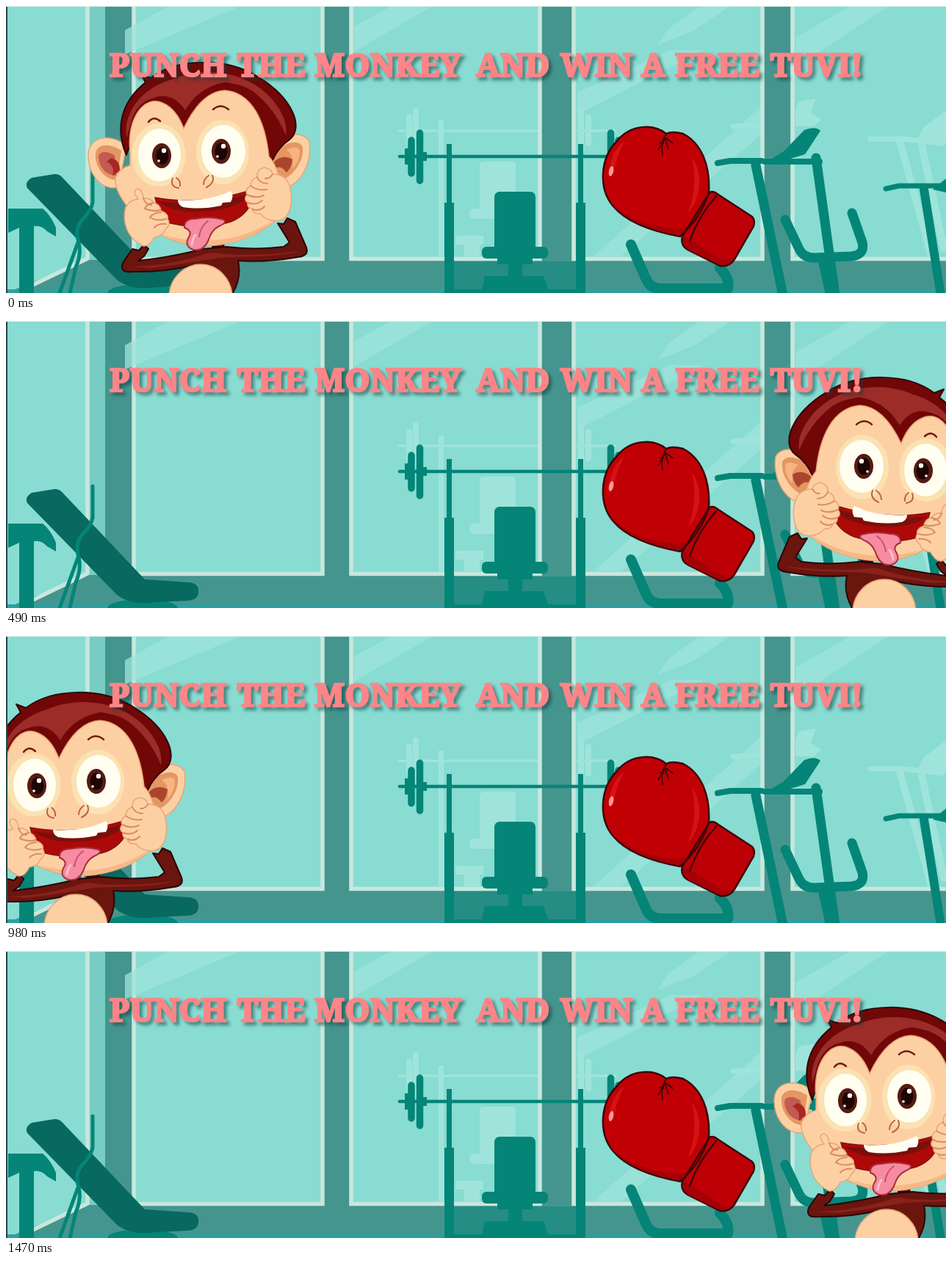
An HTML page that plays this animation: 1280x391 px, repeating every 1.54 s.

```html
<!DOCTYPE html>
<html lang="en">
<head>
<meta charset="utf-8">
<title>Punch the monkey</title>
<style>
html, body { margin: 0; width: 100%; height: 100%; overflow: hidden; background: #45958f; }
svg { display: block; width: 100vw; height: 100vh; }
.line { fill: none; stroke-linecap: round; stroke-linejoin: round; }
.pane { fill: #88dcd2; stroke: #c8e7dd; stroke-width: 5.5; }
.far { fill: #9fe4db; }
.far .line { stroke: #9fe4db; }
.gear { fill: #048577; }
.gear .line { stroke: #048577; }
.skin { fill: #fdd0a3; stroke: #e9a678; stroke-width: 1.5; }
.fur { fill: #6b150f; stroke: #2c0505; stroke-width: 2; stroke-linejoin: round; }
.head { font: 900 43px "Noto Serif", "Liberation Serif", serif; letter-spacing: .5px; fill: #fd8587; stroke: #fd8587; stroke-width: 2.6; filter: drop-shadow(4px 4px 2px rgba(15, 60, 60, .55)); }
</style>
</head>
<body>
<svg viewBox="0 0 1280 391" preserveAspectRatio="none">
  <clipPath id="glass"><path d="M474 0H724V341H474ZM777 0H1027V341H777ZM1075 0H1280V341H1075Z"/></clipPath>

  <g id="room">
    <path fill="#45958f" d="M0 0H1280V391H0Z"/>
    <path fill="#88dcd2" d="M0 0H111V346L0 391Z"/>
    <path fill="#77cdc3" d="M113 0H135V346H113Z"/>
    <path class="line" stroke="#c8e7dd" stroke-width="5.5" d="M111 -5V344L22 387"/>
    <path fill="#45958f" d="M116 347H140V391H28Z"/>
    <g id="panes"></g>
    <path class="far" d="M162 33L222 0H320L162 66ZM474 28L525 0H581L474 62ZM887 53L903 30L945 0H987L936 34ZM778 118L905 60L950 60L778 148ZM800 341L1027 138V176L838 341ZM1075 43L1150 0H1202L1075 84Z" opacity=".75"/>

    <g class="far" clip-path="url(#glass)">
      <path class="line" stroke-width="3.5" d="M535 170H830"/>
      <path class="line" stroke-width="8" d="M549 151V187M558 142V197M783 142V197M793 151V187"/>
      <path d="M589 156H596V341H589Z"/>
      <rect x="645" y="212" width="49" height="72" rx="5"/>
      <rect x="631" y="276" width="70" height="14" rx="6"/>
      <path d="M612 313H650V325H612ZM624 322H645V348H624Z"/>
      <path class="line" stroke-width="7" d="M990 164L1050 161M1177 181L1222 181L1275 187"/>
      <path class="line" stroke-width="10" d="M1217 184L1260 340M1247 190L1277 330"/>
      <path d="M1046 163L1070 151L1080 130L1103 126L1096 145L1110 155L1100 164ZM1240 184L1250 165L1280 142V187Z"/>
    </g>

    <g class="gear">
      <path fill="#258d83" d="M608 348H778V391H608Z"/>
      <path fill="#2e9fa0" d="M0 386H1280V391H0Z"/>
      <path d="M3 276H50Q61 285 68 302V314L56 307Q48 298 38 300V391H18V302L3 309Z"/>
      <ellipse cx="186" cy="391" rx="48" ry="12"/>
      <path fill="#07695f" d="M29 248Q25 240 35 234L66 229Q73 228 79 236L189 352L248 356Q263 357 262 369Q262 380 248 381L205 383Q172 388 152 374Z"/>
      <path class="line" stroke-width="5" d="M118 225V268Q116 279 104 291Q93 303 99 322Q103 338 95 356L87 391M98 322L73 391"/>

      <path class="line" stroke-width="4.5" d="M536 205H834"/>
      <path class="line" stroke-width="9.5" d="M552 183V228M563.5 173V238M823.5 173V238M834 183V228"/>
      <path d="M543 194H548V216H543ZM567 199H573V211H567Z"/>
      <path d="M600 188H607V268H610V391H597V268H600ZM779 188H786V268H789V391H776V268H779Z"/>
      <rect x="665" y="253" width="56" height="82" rx="7"/>
      <rect x="648" y="328" width="90" height="16" rx="6"/>
      <path d="M669 342H717V352H703V368H732L740 391H647L652 368H684V352H669ZM608 386H778V391H608Z"/>

      <path class="line" stroke-width="8" d="M969 214L986 211H1029M1034 212H1108"/>
      <path class="line" stroke-width="13" d="M1021 217L1058 394M1103 207L1129 394"/>
      <path d="M1030 216L1059 198L1087 169Q1102 163 1109 170L1088 202L1062 210Z"/>
      <path class="line" stroke-width="13" d="M1061 291L1080 331Q1086 343 1100 343L1151 341Q1170 339 1166 322L1152 282M1112 345L1122 391"/>
      <path class="line" stroke-width="14" d="M851 325L872 373Q878 385 891 385H983Q986 371 972 357"/>
      <path class="line" stroke-width="7" d="M1198 249L1216 245H1280"/>
      <path class="line" stroke-width="12" d="M1250 250L1273 394"/>
      <path d="M1262 250L1280 235V254Z"/>
    </g>
  </g>

  <g id="monkey">
    <path class="fur" d="M172 331L181 333L188 325L194 331L188 341L180 347Q225 342 268 331L300 328Q340 333 378 328L386 322L370 296L378 297L383 289L394 294L409 329Q413 340 398 342Q352 350 316 347Q321 369 309 391H229Q239 366 256 353Q216 363 172 362Q154 364 159 350Z"/>
    <path fill="#8a211b" d="M169 355Q225 354 274 337Q282 335 296 338Q350 341 399 334Q385 339 349 341Q310 342 291 343Q245 351 199 357Z"/>
    <ellipse class="skin" cx="265" cy="397" rx="43" ry="45"/>
    <path class="fur" d="M282 317H298L296 328H281Z"/>

    <g id="ears">
      <path class="skin" d="M164 190C143 174 119 177 113 196C108 222 126 252 153 247Z"/>
      <path fill="#e59662" d="M157 197C142 187 125 187 122 200C120 220 136 238 151 237Z"/>
      <path fill="#c25b55" d="M148 204C139 197 126 197 126 206C127 221 138 231 150 231Z"/>
      <path fill="#a92724" d="M143 207Q156 210 155 225L145 231Q149 218 137 212Z"/>
      <path class="skin" d="M361 195C373 174 405 168 413 185C418 216 397 252 370 248Z"/>
      <path fill="#e59662" d="M363 204C374 186 399 180 404 192C407 212 387 237 372 237Z"/>
      <path fill="#f5b582" d="M382 196Q400 188 400 199Q399 213 390 222Q393 203 382 196Z"/>
      <path fill="#ab442d" d="M365 212Q377 201 390 209Q389 220 382 227Q374 215 365 222Z"/>
    </g>

    <path class="fur" style="fill:#710707" d="M164 203C149 169 155 132 190 104L184 93L197 98C234 70 301 70 344 97C391 126 406 166 386 182Q370 193 362 212L352 185L168 191Z"/>
    <path fill="#9b2c28" d="M164 180C159 143 187 111 226 100C275 79 337 92 367 133Q384 155 381 176Q366 139 336 116C306 96 266 104 244 142C222 108 181 118 164 180Z"/>
    <path fill="#710707" d="M167 192C164 143 190 119 216 126Q234 134 242 152Q260 110 298 104C339 106 362 160 362 212L349 204Z"/>
    <path class="skin" d="M169 201C164 151 189 121 213 132Q232 140 242 167C259 131 278 116 298 115C335 118 353 157 358 205C372 220 382 262 372 287C338 322 273 337 228 319C193 309 145 261 149 234Q154 221 169 217Z"/>
    <path fill="#f6b886" d="M214 311C262 328 325 320 364 291C335 324 272 335 229 318Z"/>

    <g fill="#fbe2b2">
      <ellipse cx="208" cy="203" rx="36.5" ry="43"/>
      <ellipse cx="295" cy="199" rx="36" ry="44"/>
    </g>
    <g fill="#fffef0">
      <ellipse cx="209" cy="203" rx="29" ry="36"/>
      <ellipse cx="296" cy="198" rx="30" ry="36"/>
    </g>
    <g fill="#541b12">
      <ellipse cx="212" cy="204" rx="13" ry="17"/>
      <ellipse cx="293" cy="198" rx="13" ry="17"/>
    </g>
    <g fill="#1d0504">
      <ellipse cx="213" cy="204" rx="8.5" ry="11.5"/>
      <ellipse cx="293" cy="198" rx="8.5" ry="11.5"/>
    </g>
    <g fill="#fff">
      <circle cx="215" cy="197" r="3.2"/><circle cx="296" cy="191" r="3.2"/>
      <circle cx="208" cy="211" r="1.8"/><circle cx="288" cy="205" r="1.8"/>
    </g>
    <path class="line" stroke="#701b13" stroke-width="2.5" d="M194 158Q201 149 210 157M282 141Q292 132 303 141"/>
    <path class="line" stroke="#b96442" stroke-width="2" d="M227 235Q223 246 235 248M232 234Q238 238 237 245M281 231Q285 241 273 247M276 231Q269 236 269 243"/>

    <path fill="#ad0909" stroke="#7d160e" stroke-width="1.5" d="M203 261Q269 273 339 249Q335 283 306 294Q267 306 224 296Q209 287 203 261Z"/>
    <path fill="#79100b" d="M207 266Q270 276 334 255Q316 278 269 280Q229 283 207 266Z"/>
    <path fill="#fffef2" d="M234 264Q276 267 306 252Q311 258 306 267L295 268L293 272Q265 278 241 274Q234 271 234 264Z"/>
    <path fill="#f68ba1" stroke="#a72e3b" stroke-width="2" d="M243 302Q242 290 258 290Q278 286 296 291Q302 295 290 300Q280 305 276 318Q269 335 255 332Q241 327 250 313Q253 306 243 302Z"/>
    <path class="line" stroke="#c75068" stroke-width="2" d="M275 293Q265 300 263 314"/>
    <path class="line" stroke="#ffc0c7" stroke-width="3" d="M253 325Q254 317 258 312"/>

    <g class="skin">
      <path d="M180 263Q171 252 179 249Q186 250 187 262Q197 261 201 268Q210 270 211 279Q222 283 220 290Q225 298 217 304Q214 313 202 315Q195 328 187 327Q173 320 167 309Q158 292 163 274Q169 264 180 263Z"/>
      <path d="M329 268Q323 264 328 257Q325 249 333 245Q333 236 342 233Q341 222 352 220Q362 222 363 229Q379 229 385 242Q391 257 387 275Q384 289 373 292Q357 295 346 283Q337 284 335 276Q328 275 329 268Z"/>
    </g>
    <path class="line" stroke="#d98d60" stroke-width="2" d="M187 262Q190 271 198 271M201 268Q191 270 189 276Q200 281 210 278M211 281Q200 282 196 288Q206 294 218 290M218 297Q207 296 202 302M342 233Q345 241 356 242M333 245Q343 252 355 250M328 257Q340 263 351 258M329 268Q341 272 349 265M336 277Q346 280 352 273M363 229Q359 236 353 235"/>
  </g>

  <g id="glove" stroke="#3c0708" stroke-width="2.5" stroke-linejoin="round">
    <path fill="#c10006" d="M899 174C882 160 850 161 832 184C808 208 807 250 827 273C847 297 885 308 918 314Q946 290 957 254C959 217 947 187 922 174Q907 170 899 174Z"/>
    <path fill="#bd0006" d="M958 254Q963 251 970 257L1013 285Q1021 289 1018 300L992 345Q985 356 972 354L928 332Q918 326 921 314Q938 286 958 254Z"/>
    <g stroke="none">
      <path fill="#a50006" d="M822 266C847 292 886 302 917 304L929 300L917 312C878 306 840 290 822 266ZM923 314Q948 328 974 346L987 346Q979 355 968 351L929 332Q921 325 923 314Z"/>
      <path fill="#d61216" d="M822 222Q824 199 842 184Q829 209 827 231ZM934 206Q949 228 942 257Q937 274 929 281Q943 244 934 206Z"/>
      <ellipse cx="824" cy="225" rx="3" ry="7" transform="rotate(12 824 225)" fill="#ff9a94"/>
    </g>
    <path class="line" d="M957 254Q946 289 919 313M967 259Q943 286 931 320"/>
    <path class="line" stroke-width="1.6" d="M899 175Q891 184 894 203M898 180L888 196M898 181L902 195M899 180L908 187M896 187L890 186"/>
  </g>

  <g class="head" id="words"></g>
  <path fill="#25484b" d="M0 0H2V391H0Z"/>
  <path fill="#d5f0eb" d="M0 0H1280V1H0Z"/>
</svg>
<script>
const $ = id => document.getElementById(id);

$('panes').innerHTML = [171, 467, 770, 1068].map(x =>
  `<rect class="pane" x="${x + 3}" y="-8" width="257" height="352.5"/>`).join('');

const words = [['PUNCH', 141], ['THE', 315], ['MONKEY', 420], ['AND', 640],
  ['WIN', 755], ['A', 865], ['FREE', 911], ['TUVI!', 1041]];
$('words').innerHTML = words.map(([w, x]) => `<text x="${x}" y="95.5">${w}</text>`).join('');

// step, left edge, speed per step; speed is zero at each turn
const path = [
  [0, 112, -150], [2, -60, 0], [4, 212, 250], [7, 1047, 100], [8, 1095, 0],
  [11, 490, -300], [14, -58, 0], [18, 812, 250], [20, 1095, 0], [21, 1046, -120]
];
const STEP = 70, LOOP = 1540, WIDTH = 302, HOME = 112;

function place(k) {
  let i = 0;
  while (i < path.length - 2 && path[i + 1][0] <= k) i++;
  const [a, x0, v0] = path[i], [b, x1, v1] = path[i + 1];
  const h = b - a, u = (k - a) / h, w = 1 - u;
  return x0 * w * w * (1 + 2 * u) + x1 * u * u * (3 - 2 * u)
    + h * u * w * (v0 * w - v1 * u);
}

function draw(ms) {
  const k = Math.floor(ms % LOOP / STEP);
  const x = place(k);
  const right = (k > 2 && k <= 8) || (k > 14 && k <= 20);
  $('monkey').setAttribute('transform', right
    ? `translate(${x + WIDTH + HOME} 0) scale(-1 1)`
    : `translate(${x - HOME} 0)`);
}

let start;
function tick(now) {
  if (start === undefined) start = now;
  draw(now - start);
  requestAnimationFrame(tick);
}
draw(0);
requestAnimationFrame(tick);
</script>
</body>
</html>
```
